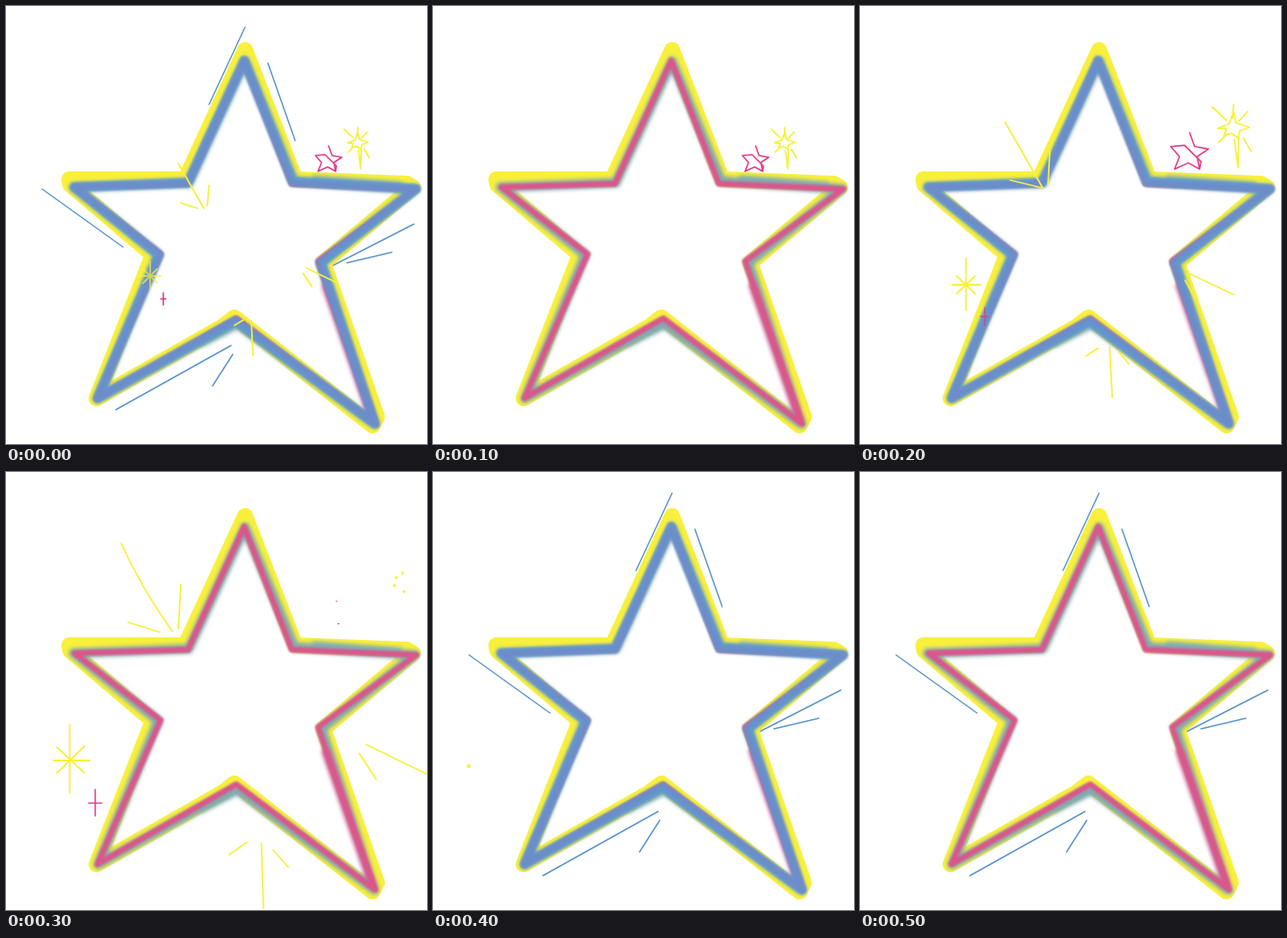
Recreate the animation shown at these times as an HTML page. Size 479 px wide and 498 px high, loop 600 ms.

```html
<!DOCTYPE html>
<html lang="en">
<head>
<meta charset="utf-8">
<title>Sparkling star</title>
<style>
  html, body { margin: 0; width: 100%; height: 100%; overflow: hidden; background: #fff; }
  svg { display: block; width: 479px; height: 498px; }
  path, use { fill: none; stroke-linecap: round; stroke-linejoin: round; }
  #starlet, #twinkle { vector-effect: non-scaling-stroke; }

  .yellow { stroke: #f8f03c; stroke-width: 1.8; }
  .pink { stroke: #e23a86; stroke-width: 1.6; }
  .dots { stroke-width: 3.4; }
  .speed { stroke: #5793cb; stroke-width: 1.5; }

  .slot, .pair, .half, .blink { animation: 600ms step-end infinite; }
  .slot { animation-name: slot; animation-delay: calc(var(--i) * 100ms - 600ms); }
  .pair { animation-name: pair; }
  .half { animation-name: half; animation-delay: -200ms; }
  .blink { animation-name: half; animation-duration: 200ms; }
  @keyframes slot { 0% { visibility: visible; } 16.66%, 100% { visibility: hidden; } }
  @keyframes pair { 0% { visibility: visible; } 33.33%, 100% { visibility: hidden; } }
  @keyframes half { 0% { visibility: visible; } 50%, 100% { visibility: hidden; } }
</style>
</head>
<body>
<svg viewBox="0 0 479 498">
  <defs>
    <filter id="soft" filterUnits="userSpaceOnUse" x="0" y="0" width="479" height="498"><feGaussianBlur stdDeviation="1.9"/></filter>
    <filter id="crisp" filterUnits="userSpaceOnUse" x="0" y="0" width="479" height="498"><feGaussianBlur stdDeviation="1.2"/></filter>
    <path id="starlet" d="M0-15 L4-4 L15-2 L6 4 L8 14 M9 8 L8 14 L-1 9 L-12 14 L-8 4 L-15-4 L-4-5 Z"/>
    <path id="twinkle" d="M-25-23 L-9-8 M15-18 L5-7 M-1-26 L-2-11 M-1-18 L2-5 L17 0 L6 4 L4 12 L-3 7 L-12 9 L-9 2 L-19 1 L-6-4 Z M0 14 L4 46 L5 12 M10 12 L19 27 M-9 8 L-18 17"/>
  </defs>

  <path class="speed half" d="M272 24 L231 112 M298 65 L329 153 M41 208 L133 274 M464 248 L372 295 M439 280 L388 292 M256 386 L125 459 M258 396 L235 432 M157 292 L142 328"/>
  <path class="speed slot" style="--i:2" d="M157 292 L142 328"/>

  <!-- star body -->
  <path stroke="#f8f03c" stroke-width="18" d="M272 50 L329 197 L456 202 L463 206 L361 292 L422 467 L417 477 L260 354 L247 364 L103 446 L167 283 L73 203 L72 197 L204 197 Z"/>
  <g filter="url(#soft)">
    <path stroke="#82a9ae" stroke-width="11" d="M272 63 L328 199 L465 208 L359 292 L419 475 L261 360 L105 446 L173 283 L77 206 L208 201 Z"/>
    <path stroke="#7fabb5" stroke-width="7" d="M351 196 L448 203 M261 365 L222 385"/>
    <path stroke="#c9679f" stroke-width="10" d="M364 318 L417 470"/>
  </g>
  <path filter="url(#crisp)" stroke="#da568b" stroke-width="6.5" d="M271 62 L325 202 L467 208 L355 290 L420 475 L262 355 L104 446 L176 282 L78 206 L207 202 Z"/>
  <g class="blink">
    <path filter="url(#crisp)" stroke="#5b96d4" stroke-opacity=".86" stroke-width="11" d="M271 62 L326 200 L467 208 L358 292 L420 475 L261 358 L104 446 L174 283 L78 206 L207 201 Z"/>
  </g>

  <g class="pair">
    <use href="#starlet" class="pink" transform="translate(367 174)"/>
    <use href="#twinkle" class="yellow" transform="translate(401 155) scale(.65)"/>
  </g>

  <g class="slot" style="--i:0">
    <path class="yellow" d="M196 179 L225 230 M231 204 L229 227 M199 224 L218 230 M342 298 L377 315 M338 304 L348 319 M279 358 L281 397 M260 363 L270 357"/>
    <path class="yellow" stroke-opacity=".7" d="M164 291 V321 M152 307 H176 M156 299 L172 315 M172 299 L156 315"/>
    <path class="pink" d="M179 326 V340 M176 333 H182"/>
  </g>

  <g class="slot" style="--i:2">
    <path class="yellow" d="M165 132 L208 207 M216 165 L214 202 M171 198 L208 207 M374 304 L425 328 M370 312 L382 334 M284 388 L287 445 M257 398 L271 389 M295 394 L306 407"/>
    <path class="yellow" d="M120.500 287 V346 M105 317 H137 M110 307 L131 327 M131 307 L110 327"/>
    <path class="pink" stroke-opacity=".8" d="M142 343 V363 M137 353 H146"/>
    <use href="#starlet" class="pink" transform="translate(375 165.500) scale(1.43)"/>
    <use href="#twinkle" class="yellow" transform="translate(426 138)"/>
  </g>

  <g class="slot" style="--i:3">
    <path class="yellow" d="M131 81 Q153 130 189 181 M199 128 L196 178 M139 171 L175 182 M410 310 L478 343 M402 320 L421 349 M290.500 422 L293 496 M254 435 L274 421 M304 430 L321 449"/>
    <path class="yellow" d="M72.500 287 V365 M54 328 H95 M58 313 L89 342 M89 312 L58 342"/>
    <path class="pink" d="M101.500 361 V391 M94 376.500 H109"/>
    <path class="pink" stroke-width="2" d="M376 147 h.1 M378 172.500 h.6"/>
    <path class="yellow dots" d="M444 120 h.1 M451 115 h.1 M442 129 h.1 M453 136 h.1"/>
  </g>

  <path class="yellow dots slot" style="--i:4; stroke-width:4.500" d="M40.500 334.500 h.1"/>
</svg>
</body>
</html>
```
